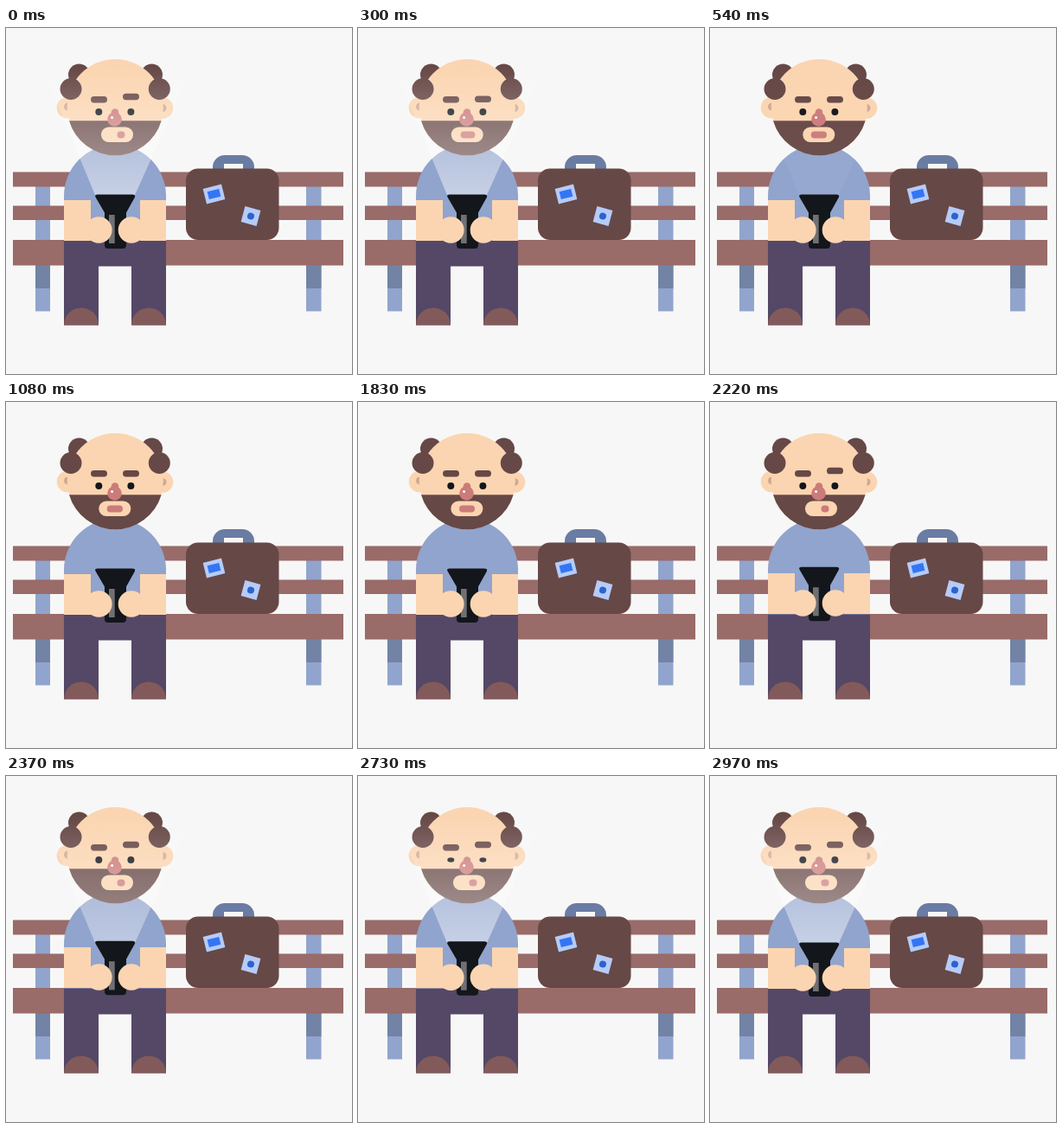
Animation of 400 by 400 pixels, one loop 3 s. Source, as an HTML page:

```html
<!DOCTYPE html>
<html lang="en">
<head>
<meta charset="utf-8">
<title>Man on a bench</title>
<style>
  html, body { margin: 0; width: 100%; height: 100%; overflow: hidden; background: #f7f7f7; }
  svg { display: block; width: 100vw; height: 100vh; }
  .plank { fill: #996b69; }
  .post { fill: #91a4cd; }
  .shade { fill: #7283a6; }
  .brown { fill: #664846; }
  .skin { fill: #fbd5b1; }
  .pink { fill: #cb7b7a; }
  .dark { fill: #13161a; }
</style>
</head>
<body>
<svg viewBox="0 0 400 400">
  <defs>
    <linearGradient id="glow" gradientUnits="userSpaceOnUse" x1="0" y1="44" x2="0" y2="193">
      <stop offset="0" stop-color="#fff" stop-opacity="0"/>
      <stop offset=".42" stop-color="#fff" stop-opacity=".25"/>
      <stop offset="1" stop-color="#fff" stop-opacity=".48"/>
    </linearGradient>
  </defs>

  <!-- bench -->
  <path class="post" d="M34 183h17v144.500h-17zM347 183h17.500v144.500h-17.500z"/>
  <path class="shade" d="M34 274h17v27h-17zM347 274h17.500v27h-17.500z"/>
  <path class="plank" d="M8 166.500h382v17H8zM8 205.500h382v16.500H8zM8 245h382v29.500H8z"/>

  <!-- suitcase -->
  <path fill="#6a7ca3" fill-rule="evenodd" d="M239 165v-4a14 14 0 0 1 14-14h20a14 14 0 0 1 14 14v4zM252 157v6h22v-6z"/>
  <rect class="brown" x="208" y="162.500" width="107.500" height="82.500" rx="14"/>
  <g transform="translate(240.500 192) rotate(-14)">
    <rect x="-11" y="-9" width="22" height="18" fill="#b5ccf8"/>
    <rect x="-7" y="-4.500" width="14" height="9" fill="#3475f4"/>
  </g>
  <g transform="translate(283 217.500) rotate(15)">
    <rect x="-9.300" y="-9.300" width="18.600" height="18.600" fill="#b5ccf8"/>
    <circle r="4" fill="#2d62cf"/>
  </g>

  <!-- body -->
  <path fill="#91a4cd" d="M67 247v-53a59 59 0 0 1 118 0v53z"/>
  <path fill="#544866" d="M67 245.500h118v98h-40v-68h-38v68H67z"/>
  <path fill="#835a5a" d="M67 343.500a20 20 0 0 1 40 0zM145 343.500a20 20 0 0 1 40 0z"/>

  <!-- head -->
  <g class="skin">
    <circle cx="71" cy="92" r="12.300"/>
    <circle cx="181" cy="92.500" r="12.300"/>
  </g>
  <path fill="#cfa993" d="M71.500 86.500a4.500 4.500 0 0 0 0 9zM181 88a4.500 4.500 0 0 1 0 9z"/>
  <g class="brown">
    <circle cx="84.500" cy="54" r="12.500"/>
    <circle cx="168.500" cy="54" r="12.500"/>
  </g>
  <circle class="skin" cx="126.300" cy="91.500" r="55.500"/>
  <path class="brown" d="M73 107.200H179.600A55.500 55.500 0 0 1 73 107.200z"/>
  <g class="brown">
    <circle cx="75" cy="70.500" r="12.500"/>
    <circle cx="177.300" cy="70.500" r="12.500"/>
    <rect x="98" y="79" width="19" height="7.500" rx="3.700"/>
    <rect id="brow" x="135" y="79" width="19" height="7.500" rx="3.700"/>
  </g>
  <g class="dark">
    <ellipse class="eye" cx="107.300" cy="97" rx="4" ry="4"/>
    <ellipse class="eye" cx="144.400" cy="97" rx="4" ry="4"/>
  </g>
  <g class="pink">
    <circle cx="126" cy="97.500" r="4.300"/>
    <circle cx="125.500" cy="105.500" r="8.300"/>
  </g>
  <circle cx="122.600" cy="103.500" r="1.500" fill="#fff"/>
  <rect id="mouth" class="skin" y="114.500" width="37" height="17.500" rx="8.750"/>
  <rect id="lips" class="pink" y="119.500" height="8" rx="4"/>

  <path id="beam" fill="url(#glow)" d="M103 193L41 44H216L149 193z"/>

  <!-- arms and phone -->
  <g id="arms">
    <path class="skin" d="M67 199h31v47H67zM155 199h30v47h-30z"/>
  </g>
  <g id="phone">
    <path class="dark" d="M106 192.500h40q4 0 3 3l-10 18v37.500q0 4-4 4h-17q-4 0-4-4v-37.500l-10.500-18q-1.500-3 2.500-3z"/>
    <rect x="119" y="216" width="6.700" height="33" fill="#6f7073"/>
  </g>
  <g id="hands" class="skin">
    <circle cx="107.300" cy="233.500" r="15.300"/>
    <circle cx="145" cy="233.500" r="15.300"/>
  </g>
</svg>
<script>
const $ = id => document.getElementById(id);
const eyes = document.querySelectorAll('.eye');
const set = (el, attrs) => { for (const k in attrs) el.setAttribute(k, attrs[k]); };
const span = (t, a, b) => Math.min(1, Math.max(0, (t - a) / (b - a)));
const ease = u => u < .5 ? 2 * u * u : 1 - 2 * (1 - u) ** 2;
const mix = (a, b, u) => a + (b - a) * u;
const blink = (t, start) => Math.max(0, 1 - Math.abs(t - start - 90) / 90);
const shift = (id, y) => set($(id), { transform: `translate(0 ${y})` });

function draw(t) {
  const relax = ease(span(t, 0, 420));
  const wide = relax - ease(span(t, 1800, 2070));
  const frown = relax - ease(span(t, 2070, 2250));
  const lift = ease(span(t, 2070, 2220)) - (1 - (1 - span(t, 2700, 2970)) ** 2);
  const light = 1 - span(t, 300, 570) + span(t, 2220, 2400);

  set($('mouth'), { x: mix(110, 107.3, wide) });
  set($('lips'), { x: mix(128.5, 116.7, wide), width: mix(9, 18.3, wide) });
  set($('brow'), { y: mix(75.7, 79, frown) });
  set($('beam'), { opacity: light });
  shift('phone', -1.7 * lift);
  shift('arms', -lift);
  shift('hands', -lift);

  const shut = blink(t, 900) + blink(t, 2700);
  eyes.forEach(eye => set(eye, { ry: 4 * (1 - .9 * shut) }));
}

const start = performance.now();
function tick() {
  draw((performance.now() - start) % 3000);
  requestAnimationFrame(tick);
}
tick();
</script>
</body>
</html>
```
